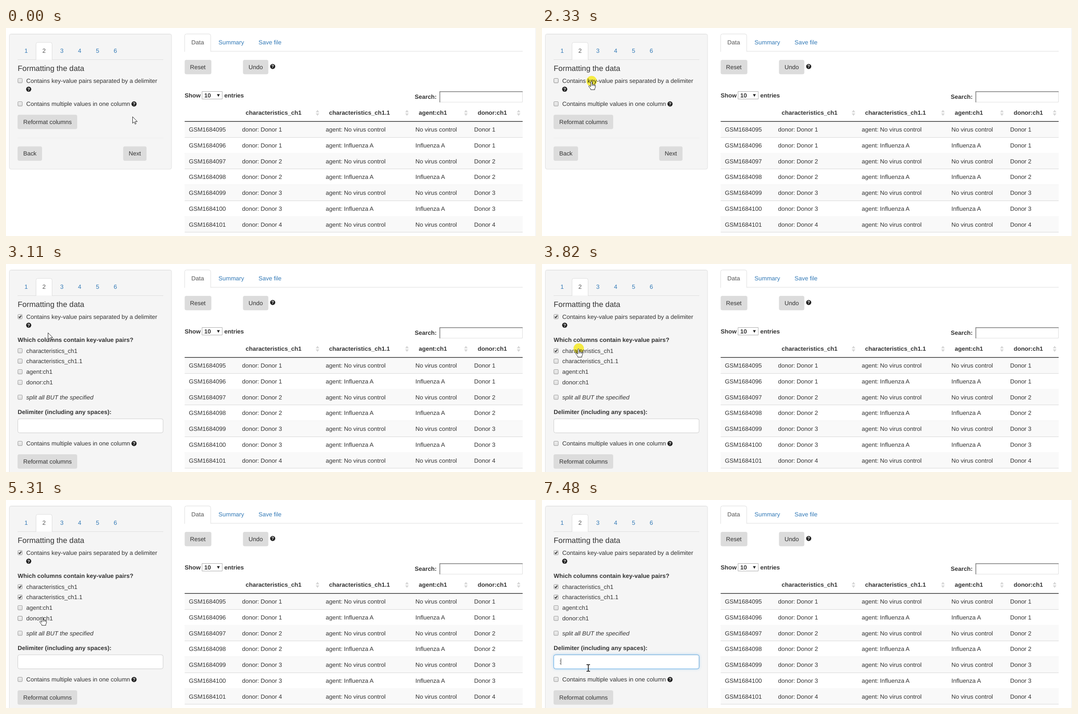
An HTML page with a canvas that plays this animation: 1191x470 px, repeating every 8 s.

```html
<!DOCTYPE html>
<html lang="en">
<head>
<meta charset="utf-8">
<title>Formatting the data</title>
<style>
html, body { margin: 0; width: 100%; height: 100%; overflow: hidden; background: #fff; }
canvas { display: block; }
</style>
</head>
<body>
<canvas id="stage" width="1191" height="470"></canvas>
<script>
const ctx = document.getElementById('stage').getContext('2d');
const LOOP = 8000;
const SIZE = 13.45;
const INK = '#333', LINK = '#337ab7', RULE = '#ddd';

// ---------- helpers ----------

// y is the middle of the capital letters
function text(str, x, y, { color = INK, style = '', size = SIZE, align = 'left' } = {}) {
  ctx.font = `${style} ${size}px "Liberation Sans", Arial, sans-serif`;
  ctx.textRendering = 'geometricPrecision';
  ctx.textAlign = align;
  ctx.fillStyle = color;
  ctx.fillText(str, x, y + size * 0.355);
}

const bold = (str, x, y) => text(str, x, y, { style: 'bold' });

function rect(x, y, w, h, color) {
  ctx.fillStyle = color;
  ctx.fillRect(x, y, w, h);
}

function box(x, y, w, h, r, fill, stroke) {
  ctx.beginPath();
  ctx.roundRect(x, y, w, h, r);
  if (fill) { ctx.fillStyle = fill; ctx.fill(); }
  if (stroke) { ctx.strokeStyle = stroke; ctx.lineWidth = 1; ctx.stroke(); }
}

function poly(color, ...pts) {
  ctx.beginPath();
  for (let i = 0; i < pts.length; i += 2) ctx.lineTo(pts[i], pts[i + 1]);
  ctx.fillStyle = color;
  ctx.fill();
}

function button(label, x, y, w, textX) {
  box(x, y, w, 32.5, 4, '#dcdcdc');
  text(label, textX, y + 16.2);
}

function help(x, y) {
  ctx.beginPath();
  ctx.arc(x, y, 5.8, 0, 7);
  ctx.fillStyle = '#222';
  ctx.fill();
  text('?', x, y, { color: '#fff', style: 'bold', size: 9.8, align: 'center' });
}

function tab(x, y, w, bottom) {
  box(x, y, w, bottom - y + 4, [4, 4, 0, 0], '#fff', RULE);
}

// ---------- cursor ----------

const linear = u => u;
const easeIn = u => u * u;
const easeOut = u => 1 - (1 - u) ** 2;
const easeBoth = u => u * u * (3 - 2 * u);

// first step, last step, number of steps, end point, easing
const LEGS = [
  [550, 1090, 8, 147, 147, easeBoth],
  [1170, 1320, 3, 131, 134, linear],
  [1400, 1710, 5, 111, 120, easeOut],
  [2790, 3110, 5, 94, 155, easeIn],
  [3190, 3580, 6, 82, 191, easeOut],
  [3990, 4610, 9, 77, 221, easeBoth],
  [5090, 5700, 9, 96, 386, easeBoth],
  [5930, 5930, 1, 107.5, 379, linear],
  [6010, 6010, 1, 104, 379.5, linear]
];

function pointer(t) {
  let x = 284, y = 200;
  for (const [start, end, steps, toX, toY, ease] of LEGS) {
    if (t < start) break;
    const span = (end - start) / (steps - 1 || 1) || 1;
    const k = Math.min(steps, Math.floor((t - start) / span + 0.1) + 1);
    const u = ease(k / steps);
    x += (toX - x) * u;
    y += (toY - y) * u;
  }
  return { x, y };
}

const HAND = new Path2D('M-1.5 12.5V1.7Q0-.9 1.5 1.7V7.2Q3-.0 1.5 7.2Q3 5.8 4.2 7.6Q6 6.4 6.8 8.6' +
  'Q9 8 9 10.5V14.2L7.5 17V19.5H-1.5V18L-4.3 14.4L-6 11.5Q-5.6 9.6-3.8 10.5Z');
const KNUCKLES = new Path2D('M1.5 7V11M4.2 7.8V11M6.8 8.8V11.5');
const ARROW = new Path2D('M.5.5V15.2L3.8 12.1L6.2 17.3L8.4 16.3L6.1 11.4H11Z');
const BEAM = new Path2D('M-4-7.5H-1.2L0-6.7L1.2-7.5H4M0-6.7V6.7M-4 7.5H-1.2L0 6.7L1.2 7.5H4');

function drawCursor({ x, y }, shape) {
  ctx.save();
  ctx.translate(x, y);
  ctx.lineJoin = 'round';
  if (shape === 'beam') {
    ctx.lineWidth = 1.6;
    ctx.strokeStyle = '#111';
    ctx.stroke(BEAM);
  } else {
    const path = shape === 'hand' ? HAND : ARROW;
    ctx.lineWidth = 1;
    ctx.fillStyle = '#fff';
    ctx.strokeStyle = '#222';
    ctx.fill(path);
    ctx.stroke(path);
    if (shape === 'hand') ctx.stroke(KNUCKLES);
  }
  ctx.restore();
}

const CLICKS = [[2260, 2410], [3750, 3990], [4920, 5090], [6390, 6550]];

function drawClick(t, { x, y }) {
  if (!CLICKS.some(([on, off]) => t >= on && t < off)) return;
  ctx.save();
  ctx.globalCompositeOperation = 'multiply';
  ctx.beginPath();
  ctx.arc(x + 0.5, y, 11.7, 0, 7);
  ctx.fillStyle = '#fff545';
  ctx.fill();
  ctx.restore();
}

// ---------- table side ----------

const HEADS = [
  ['characteristics_ch1', 538.5, 700],
  ['characteristics_ch1.1', 726, 901],
  ['agent:ch1', 927.5, 1033.5],
  ['donor:ch1', 1060, 1152]
];

function drawTable() {
  rect(401.5, 52, 759.5, 1, RULE);
  tab(401.5, 13.5, 58.5, 49.5);
  rect(402, 52, 57.5, 6, '#fff');
  text('Data', 416.5, 32.5, { color: '#555' });
  text('Summary', 477.5, 32.5, { color: LINK });
  text('Save file', 567.5, 32.5, { color: LINK });

  button('Reset', 401.5, 72, 60, 413.5);
  button('Undo', 532.5, 72, 57, 545);
  help(599.3, 87);

  bold('Show', 401.5, 152.7);
  box(440.5, 143.5, 45.5, 17, 0, '#fff', '#a9a9a9');
  bold('10', 445.5, 152.7);
  poly('#222', 474, 149.5, 480.5, 149.5, 477.2, 155.5);
  bold('entries', 490.5, 152.7);

  bold('Search:', 918.5, 155);
  box(974.5, 143.5, 186, 24, 0, '#fff', '#dedede');
  rect(974, 143, 187, 1.7, '#858585');
  rect(974, 143, 1.7, 25, '#858585');

  for (const [label, x, sortX] of HEADS) {
    bold(label, x, 191.5);
    poly('#d6d6d6', sortX - 4, 190.5, sortX + 4, 190.5, sortX, 185);
    poly('#d6d6d6', sortX - 4, 193, sortX + 4, 193, sortX, 198.5);
  }

  const pitch = 35.77;
  for (let i = 0; i < 7; i++) {
    const top = 211 + pitch * i, mid = top + 18.3;
    const agent = i % 2 ? 'Influenza A' : 'No virus control';
    const donor = 'Donor ' + (1 + (i >> 1));
    if (i % 2 === 0) rect(401.5, top, 759.5, pitch, '#f9f9f9');
    text('GSM' + (1684095 + i), 411, mid);
    text('donor: ' + donor, 530.5, mid);
    text('agent: ' + agent, 718.5, mid);
    text(agent, 920, mid);
    text(donor, 1052, mid);
    rect(401.5, Math.round(top + pitch) - 0.2, 759.5, 1.2, '#dcdcdc');
  }
  rect(401.5, 210.5, 759.5, 1.3, '#111');
  rect(1190, 0, 1, 470, '#ececec');
}

// ---------- form side ----------

function option(label, y, { checked, hover, style } = {}) {
  const shade = ctx.createLinearGradient(0, y - 5, 0, y + 5);
  shade.addColorStop(0, hover ? '#f4f4f4' : '#eeeeee');
  shade.addColorStop(1, hover ? '#e6e6e6' : '#dedede');
  box(26.7, y - 4.9, 9.8, 9.8, 1.5, shade, hover ? '#858585' : '#999');
  if (checked) {
    ctx.beginPath();
    ctx.moveTo(28.8, y + 0.1);
    ctx.lineTo(30.8, y + 2.3);
    ctx.lineTo(34.4, y - 2.6);
    ctx.strokeStyle = '#333';
    ctx.lineWidth = 1.9;
    ctx.stroke();
  }
  text(label, 45.5, y + 0.2, { style });
}

function drawField(t) {
  const focus = Math.min(1, Math.max(0, Math.floor((t - 6390) / 78 + 1.1) / 3));
  if (focus) {
    ctx.save();
    ctx.shadowColor = `rgba(102,175,233,${0.6 * focus})`;
    ctx.shadowBlur = 6;
    box(26.5, 349.5, 326.5, 32, 4, '#fff');
    ctx.restore();
  }
  box(26.5, 349.8, 326.5, 31.7, 4, '#fff', '#ccc');
  if (focus) {
    ctx.globalAlpha = focus;
    box(26.5, 349.8, 326.5, 31.7, 4, null, '#5fabe8');
    ctx.globalAlpha = 1;
  }
  const typed = t >= 7480;
  if (typed) text(':', 38.7, 365.7, { color: '#555' });
  if (typed || (t >= 6390 && t < 6930)) rect(typed ? 42 : 39, 358, 1, 14.5, '#333');
}

function drawForm(t, open, at) {
  const over = (top, bottom) => at.y >= top && at.y < bottom;

  box(7.5, 13.5, 364.5, open ? 600 : 305.5, 4, '#f5f5f5', '#dfdfdf');
  rect(10, 14, 359.5, 1, '#ececec');

  rect(26, 71, 327.5, 1, RULE);
  tab(67.5, 32.5, 36, 67.5);
  rect(68, 71, 35, 1.5, '#f5f5f5');
  for (let i = 0; i < 6; i++) {
    text(String(i + 1), 45.3 + 40.1 * i, 51.5, { color: i === 1 ? '#555' : LINK, align: 'center' });
  }

  text('Formatting the data', 26.3, 90.5, { size: 17.25 });
  option('Contains key-value pairs separated by a delimiter', 119, { checked: open, hover: over(108, 149) });
  help(51, 138.3);

  if (open) {
    bold('Which columns contain key-value pairs?', 26.3, 171.7);
    option('characteristics_ch1', 196, { checked: t >= 3820, hover: over(187, 208) });
    option('characteristics_ch1.1', 219.5, { checked: t >= 4920, hover: over(208, 232) });
    option('agent:ch1', 243.5, { hover: over(232, 256) });
    option('donor:ch1', 267.5, { hover: over(256, 278) });
    option('split all BUT the specified', 301, { style: 'italic', hover: over(292, 310) });
    bold('Delimiter (including any spaces):', 26.3, 334.7);
    drawField(t);
  }

  const shift = open ? 234 : 0;
  const y = 171.4 + shift;
  option('Contains multiple values in one column', y, { hover: over(y - 9, y + 10) });
  help(287.7, y + 0.2);
  button('Reformat columns', 26, 196 + shift, 134, 38.7);

  if (!open) {
    rect(26, 248, 327.5, 1, '#efefef');
    button('Back', 26, 267.5, 55, 38.7);
    button('Next', 263.3, 267.5, 52.5, 275.7);
  }
}

function shapeAt(y, open) {
  if (y < 149) return 'hand';
  if (!open) return y > 162 && y < 182 ? 'hand' : 'arrow';
  if (y > 349 && y < 383) return 'beam';
  return (y > 187 && y < 278) || (y > 292 && y < 310) ? 'hand' : 'arrow';
}

// ---------- loop ----------

function draw(t) {
  const open = t >= 2410;
  const at = pointer(t);
  rect(0, 0, 1191, 470, '#fff');
  drawTable();
  drawForm(t, open, at);
  drawClick(t, at);
  drawCursor(at, shapeAt(at.y, open));
}

const began = performance.now();

function tick() {
  draw((performance.now() - began) % LOOP);
  requestAnimationFrame(tick);
}

tick();
</script>
</body>
</html>
```
